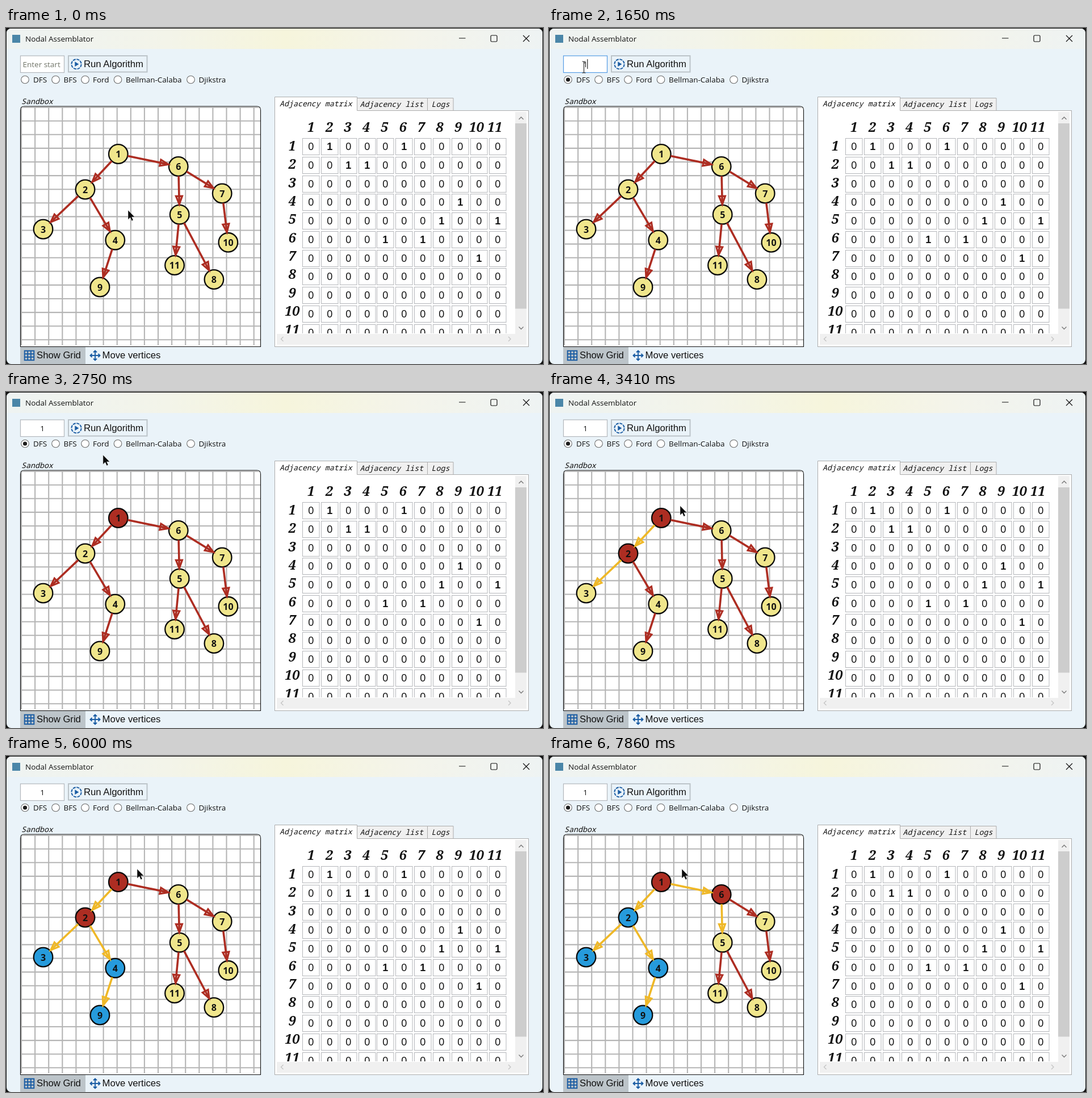
Recreate the animation shown at these times as an HTML page. Size 946 px wide and 592 px high, loop 8 s.

```html
<!DOCTYPE html>
<html lang="en">
<head>
<meta charset="utf-8">
<title>Nodal Assemblator</title>
<style>
  html, body { margin: 0; width: 100%; height: 100%; overflow: hidden; background: #111; }
  svg { display: block; width: 946px; height: 592px; }
  text { fill: #111; white-space: pre; }
  .ui { font: 13.5px "Open Sans", "Noto Sans", sans-serif; }
  .btn { font: 16.7px "Liberation Sans", Arial, sans-serif; }
  .mono { font: italic 13.3px "Noto Sans Mono", "DejaVu Sans Mono", monospace; }
  .head { font: italic 600 23.5px "Noto Serif", serif; }
  .cell { font: 18px "Liberation Sans", Arial, sans-serif; }
  .one { font-weight: bold; }
  .num { font: bold 16px "Open Sans", "Noto Sans", sans-serif; }
  .mid { text-anchor: middle; }
  .hint { fill: #707468; }
  .node circle { fill: #f0e68c; stroke: #0a0a0a; stroke-width: 2.3; }
  .edge { stroke: #ad2d22; fill: none; }
  .line { stroke-width: 3.6; }
  .tip { stroke-width: 3.2; stroke-linejoin: miter; }
  .icon { fill: none; stroke: #1a5ca3; stroke-width: 1.9; }
  .radio circle { fill: #fff; stroke: #6c6c6c; stroke-width: 1.1; }
</style>
</head>
<body>
<svg id="stage" viewBox="0 0 946 592">
  <defs>
    <linearGradient id="bar">
      <stop offset="0" stop-color="#eef3f2"/>
      <stop offset=".3" stop-color="#f3f4e9"/>
      <stop offset=".52" stop-color="#f6f5dc"/>
      <stop offset=".75" stop-color="#f4f4ea"/>
      <stop offset="1" stop-color="#eef3f3"/>
    </linearGradient>
    <clipPath id="win"><rect x="1" y="1" width="944" height="591" rx="8"/></clipPath>
    <clipPath id="view"><rect x="477" y="148" width="420" height="390"/></clipPath>
    <clipPath id="pad"><path d="M26 562V145q0-6 6-6H442q6 0 6 6V562z"/></clipPath>
  </defs>

  <g clip-path="url(#win)">
    <rect width="946" height="592" fill="#eaf3f9"/>
    <rect width="946" height="37" fill="url(#bar)"/>
  </g>
  <rect x="11" y="12" width="14" height="14" fill="#4a86a8"/>
  <text class="ui" x="34" y="24">Nodal Assemblator</text>
  <g fill="none" stroke="#111" stroke-width="1.2">
    <path d="M798 18H809.5M911 13L922 24M922 13L911 24"/>
    <rect x="854" y="13" width="11" height="11" rx="1.8"/>
  </g>

  <rect id="field" x="25.5" y="49" width="77" height="29.5" fill="#fff" stroke="#b3b8bd" stroke-width="1.2"/>
  <text id="hint" class="ui hint" x="29.5" y="69">Enter start</text>
  <text id="typed" class="ui mid" x="64" y="69">1</text>
  <path id="caret" d="M67.8 55V72" stroke="#111" stroke-width="1.1"/>

  <rect id="run" x="110" y="49" width="138.5" height="28.5" stroke="#bcc4c9" stroke-width="2"/>
  <circle class="icon" cx="124" cy="63.7" r="8.6" stroke-dasharray="5.2 1.55"/>
  <path d="M121.3 59.3L128.3 63.7L121.3 68.1z" fill="#1a5ca3"/>
  <text class="btn" x="137" y="69">Run Algorithm</text>
  <g id="radios"></g>

  <text class="mono" x="27" y="133.5">Sandbox</text>
  <path d="M25.5 561.5V144.5q0-6.5 6.5-6.5H442q6.5 0 6.5 6.5V561.5z" fill="#fff"/>
  <g clip-path="url(#pad)"><path id="grid" stroke="#a0a0a0" stroke-width="2.1" stroke-opacity=".78"/></g>
  <path d="M25.5 561.5V144.5q0-6.5 6.5-6.5H442q6.5 0 6.5 6.5V561.5z" fill="none" stroke="#111" stroke-width="1.1"/>
  <g id="nodes"></g>
  <g id="edges"></g>

  <rect x="25" y="562" width="115" height="30" fill="#bcc4c9"/>
  <path class="icon" d="M32.7 568.7H49.3V585.3H32.7zM38.2 568.7V585.3M43.8 568.7V585.3M32.7 574.2H49.3M32.7 579.8H49.3"/>
  <text class="btn" x="54" y="582">Show Grid</text>
  <path class="icon" d="M157 569V585M149 577H165M154 571.5L157 568.5L160 571.5M154 582.5L157 585.5L160 582.5M151.5 574L148.5 577L151.5 580M162.5 574L165.5 577L162.5 580"/>
  <text class="btn" x="169.5" y="582">Move vertices</text>

  <rect x="473.5" y="145.5" width="447" height="416" fill="#fff" stroke="#acacac"/>
  <path d="M618.5 123.5H742.5V145.5H618.5zM742.5 123.5H788V145.5H742.5z" fill="#f0f0f0" stroke="#acacac"/>
  <path d="M473.5 147V121.5H618.5V147" fill="#fff"/>
  <path d="M473.5 147V121.5H618.5V145.5" fill="none" stroke="#acacac"/>
  <text class="mono" x="482" y="138">Adjacency matrix</text>
  <text class="mono" x="623.5" y="138.5">Adjacency list</text>
  <text class="mono" x="749.5" y="138.5">Logs</text>
  <g id="matrix" clip-path="url(#view)"></g>
  <path d="M897 148H917V558H477V539H897z" fill="#f0f0f0"/>
  <rect x="897" y="168" width="20" height="326.5" fill="#cdcdcd"/>
  <g fill="none" stroke-width="1.3">
    <path d="M903.5 161L907.5 157L911.5 161M903.5 526.5L907.5 530.5L911.5 526.5" stroke="#777"/>
    <path d="M488.5 544L484.5 548L488.5 552M885 544L889 548L885 552" stroke="#c3c3c3"/>
  </g>

  <g id="cursor">
    <circle id="glow" cx="-5" cy="0" r="14" fill="#dcd80f" fill-opacity=".62"/>
    <path id="arrow" d="M0 0V16.5L3.9 12.9L6.5 18.8L9.1 17.6L6.6 12H11.7z" fill="#0b0b0b" stroke="#fff" stroke-width=".4"/>
    <path id="beam" d="M-3 -10H-.8L0 -9L.8 -10H3M0 -9V9M-3 10H-.8L0 9L.8 10H3" fill="none" stroke="#222" stroke-width="1.1"/>
    <path id="hand" d="M-1.5 1q1.5-2 3 0V6l5.5 1.3q2.2.6 2 3L8 15.8H0L-3.8 9.7q0-2 2.3-1z" fill="#15150f"/>
  </g>
</svg>
<script>
const LOOP = 8000, STEP = 67, R = 17;
const RED = "#ad2d22", GOLD = "#efb827", BLUE = "#269bdc";
const $ = id => document.getElementById(id);

function add(parent, tag, attrs, text) {
  const el = document.createElementNS("http://www.w3.org/2000/svg", tag);
  for (const k in attrs) el.setAttribute(k, attrs[k]);
  if (text !== undefined) el.textContent = text;
  parent.append(el);
  return el;
}

// Sandbox grid
let grid = "";
for (let i = 0; i < 18; i++) {
  const d = i * 24.1;
  grid += `M${27 + d} 139V559M26 ${139.6 + d}H448`;
}
$("grid").setAttribute("d", grid);

// Radio buttons
let dot;
[["DFS", 33.5, 48], ["BFS", 87.5, 101.5], ["Ford", 139.5, 153],
 ["Bellman-Calaba", 197, 211], ["Djikstra", 325.5, 339.5]].forEach(([name, cx, x], i) => {
  const g = add($("radios"), "g", { class: "radio" });
  add(g, "circle", { cx, cy: 91, r: 6.8 });
  if (!i) dot = add($("radios"), "circle", { cx, cy: 91, r: 3.6, fill: "#1c1c1c" });
  add(g, "text", { class: "ui", x, y: 96 }, name);
});

// Graph
const spots = [[197.8, 222], [139.5, 284.5], [65.5, 354.5], [192.3, 373.7], [305.7, 328.7], [303.7, 244],
  [380.7, 291.5], [366.4, 443], [165.5, 456.5], [391.4, 377.8], [297, 418]];
const links = "1-2 2-3 2-4 4-9 1-6 6-5 6-7 5-11 5-8 7-10".split(" ");
const parts = {};

spots.forEach(([x, y], i) => {
  const g = add($("nodes"), "g", { class: "node" });
  parts[i + 1] = add(g, "circle", { cx: x, cy: y, r: 16.8 });
  add(g, "text", { class: "num mid", x, y: y + 6 }, i + 1);
});

for (const link of links) {
  const [a, b] = link.split("-").map(n => spots[n - 1]);
  const dx = b[0] - a[0], dy = b[1] - a[1], len = Math.hypot(dx, dy);
  const turn = Math.atan2(dy, dx) * 180 / Math.PI, end = len - R - 1;
  const g = add($("edges"), "g", { class: "edge", transform: `translate(${a}) rotate(${turn})` });
  add(g, "path", { class: "line", d: `M${R} 0H${end - 1}` });
  add(g, "path", { class: "tip", d: `M${end} 0L${end - 14.5} -5.5V5.5z` });
  parts[link] = g;
}

// Adjacency matrix
const table = $("matrix"), size = spots.length;
for (let r = 0; r < size; r++) {
  add(table, "text", { class: "head mid", x: 537 + 32.4 * r, y: 183 }, r + 1);
  add(table, "text", { class: "head mid", x: 504, y: 216 + 32.35 * r }, r + 1);
  for (let c = 0; c < size; c++) {
    const x = Math.round(522 + 32.85 * c) + .5, y = Math.round(194 + 32.75 * r) + .5;
    const on = links.includes(`${r + 1}-${c + 1}`);
    add(table, "rect", { x, y, width: 29.5, height: 29, fill: "#fff", stroke: "#b4b6ba" });
    add(table, "text", { class: on ? "cell one mid" : "cell mid", x: x + 14.7, y: y + 20.7 }, on ? 1 : 0);
  }
}

// Depth-first search: time, part, colour
const visits = [
  [2350, "1", RED], [2890, "1-2", GOLD], [3150, "2", RED], [3410, "2-3", GOLD],
  [3680, "3", RED], [3940, "3", BLUE], [4470, "2-4", GOLD], [4740, "4", RED],
  [5010, "4-9", GOLD], [5270, "9", RED], [5540, "9", BLUE], [6000, "4", BLUE],
  [6800, "2", BLUE], [7340, "1-6", GOLD], [7600, "6", RED], [7860, "6-5", GOLD]
];

// Pointer: time, x, y
const path = [
  [0, 215, 321], [130, 213, 300], [270, 160, 205], [400, 88, 105], [536, 60, 66],
  [620, 60, 66], [670, 57.5, 74], [804, 34, 92], [1070, 34, 92], [1273, 61.5, 69],
  [1742, 61.5, 69], [1876, 88, 87], [2010, 128, 75], [2077, 133, 70], [2640, 133, 70],
  [2750, 172, 112], [2881, 231, 202], [3300, 231, 202], [3400, 231, 199],
  [6420, 231, 199], [6520, 233, 199], [6720, 233, 199], [6790, 234, 199], [LOOP, 234, 199]
];

function pointer(t) {
  const i = path.findIndex(p => p[0] > t);
  const [t0, x0, y0] = path[i - 1], [t1, x1, y1] = path[i];
  const k = (t - t0) / (t1 - t0);
  return [x0 + (x1 - x0) * k, y0 + (y1 - y0) * k];
}

function draw(t) {
  const within = (a, b) => t >= a && t < b;
  const show = (el, on) => { el.style.display = on ? "" : "none"; };

  for (const id in parts) parts[id].style.fill = parts[id].style.stroke = "";
  for (const [at, id, color] of visits) {
    if (t >= at) parts[id].style[id.includes("-") ? "stroke" : "fill"] = color;
  }

  const [x, y] = pointer(Math.floor(t / STEP) * STEP);
  $("cursor").setAttribute("transform", `translate(${x.toFixed(1)} ${y.toFixed(1)})`);
  const beam = within(1340, 1860), hand = within(2005, 2740);
  show($("beam"), beam);
  show($("hand"), hand);
  show($("arrow"), !beam && !hand);
  show($("glow"), within(960, 1090) || within(1380, 1510) || within(2210, 2350));

  const focus = within(1400, 2350), hover = within(550, 750) || within(1210, 1400);
  $("field").style.stroke = focus ? "#569de5" : hover ? "#7eb4ea" : "";
  $("run").style.fill = within(2005, 2740) ? "#bcc4c9" : "#eaf3f9";
  show(dot, t >= 1030);
  show($("hint"), t < 1400);
  show($("typed"), t >= 1580);
  show($("caret"), within(1580, 2070));
}

function tick(now) {
  draw(now % LOOP);
  requestAnimationFrame(tick);
}
draw(0);
requestAnimationFrame(tick);
</script>
</body>
</html>
```
